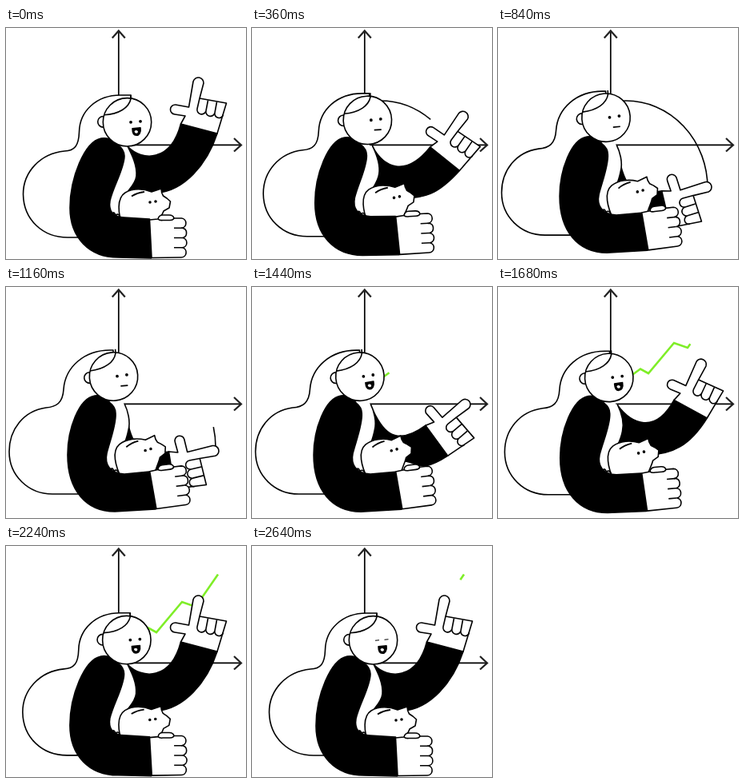
An HTML page that plays this animation: 300 by 289 pixels, repeating every 2680 ms.

```html
<!DOCTYPE html>
<html lang="en">
<head>
<meta charset="utf-8">
<title>Chart gesture</title>
<style>
  html, body { margin: 0; width: 100%; height: 100%; overflow: hidden; background: #fff; }
  svg { display: block; width: 100%; height: 100%; }
  .line { fill: none; }
  .ink { fill: #000; }
</style>
</head>
<body>
<svg viewBox="0 0 300 289" preserveAspectRatio="none" fill="#fff" stroke="#000" stroke-width="1.6" stroke-linejoin="round">
  <g class="line" stroke="#222">
    <path stroke="#000" stroke-width="1.7" d="M140.8 4V88M147 146.4H293"/>
    <path stroke-width="2.2" stroke-linejoin="miter" d="M132.8 12.5L140.8 3.5L148.8 12.5M285 138L294 146.4L285 154.5"/>
  </g>
  <path id="arc" class="line" pathLength="1" d="M140 93Q150 91 160 91A102 109 0 0 1 262 200"/>
  <path id="graph" class="line" pathLength="1" stroke="#7fee28" stroke-width="2.6" stroke-linejoin="miter" d="M158 117L178 102.5L188 108L220 70L237 76L265 35.500"/>
  <path id="hair"/>
  <path id="sleeve" class="ink"/>
  <path id="shirt" stroke="none"/>
  <path id="lapel" class="line"/>
  <g id="pointer">
    <path d="M218.500 120L224 110L211 108A6 6 0 0 1 212 96L228.500 99L234 67A6.600 6.600 0 0 1 247 69L242 88L275.500 94L264 132Z"/>
    <path class="line" d="M242 88L239 101A5.6 5.6 0 0 0 250 103.5L252.5 90.5M250 103.5A5.6 5.6 0 0 0 261 106L263.5 92.5M261 106A5.4 5.4 0 0 0 271.500 108.5"/>
  </g>
  <g id="pig">
    <path d="M146 250C140 232 138 213 149 206C159 200 172 201 182 205Q188 203 194 201Q194 206 196.500 210L201 213L205.500 217L204 225L197 229C195 235 190 241 187 250Z"/>
    <path class="line" stroke-width="1.8" d="M157 210.5Q164 206 173 205"/>
    <g id="pigEyes"><circle cx="180" cy="218" r="1"/><circle cx="187" cy="217" r="1"/></g>
  </g>
  <path id="arm" class="ink"/>
  <path id="tail" class="line" d="M143 237C141 231 136 233 138 236S133 239 134 231C137 230 136 237 141 237"/>
  <g id="fist">
    <path d="M179.500 240L190 239Q191 234 196 234H204Q209 234 210 238H219.500A6.200 6.200 0 0 1 219.500 250.300H220.500A6.200 6.200 0 0 1 220.500 262.500A6.200 6.200 0 0 1 220.500 274.800A6.200 6.200 0 0 1 219 287L182 287.500Z"/>
    <path class="line" d="M190 239Q192 241 196 240.500H205Q209 240.500 210 238M220 250.300H210M220 262.500H210M220 274.800H210"/>
  </g>
  <g id="head">
    <circle cx="-30" cy="-.5" r="6.800"/>
    <circle r="30.200"/>
    <path class="line" d="M4.500 -34V-29C2 -18 -10 -10 -29 -9"/>
    <g id="open" class="ink" stroke="none"><circle cx="4.500" cy="0" r="1.900"/><circle cx="16.500" cy="-1" r="1.900"/></g>
    <path id="shut" class="line" stroke-width="1.100" d="M2.500 .5L7.500 0M14 -.5L19 -1"/>
    <g id="smile">
      <path class="ink" d="M6.500 8L16.500 7C17.500 13.500 14.500 16.500 11.500 16.500C8 16.500 6.500 12.500 6.500 8Z"/>
      <path stroke="none" d="M9 11.500Q11 9 13.500 11.500Q13.500 14 11.500 14Q9.500 14 9 11.500Z"/>
    </g>
    <path id="flat" class="line" d="M8 12.5L17 12.3"/>
  </g>
</svg>
<script>
const LOOP = 2680, STEP = 40;
const el = id => document.getElementById(id);
const set = (id, name, value) => el(id).setAttribute(name, value);
const show = (id, on) => set(id, 'visibility', on ? 'visible' : 'hidden');

// Upright and leaning versions of the soft shapes.
const shapes = {
  hair: [
    'M156 92L156 84L143 84C113 84 92 104 91.5 130C91 147 86 153.5 73 154C43 157 21.5 180 21.5 208C22 240 46 262 77 262L95 262',
    'M134 87L134 79L130 79C98 79 74 100 72 128C71 145 63 150 50 151C22 155 4 178 4 206C4 236 28 259 58 259L95 259'],
  arm: [
    'M140 146C134 139 126 137 119 138C98 142 80 188 80 225C80 262 104 287 140 287L181.5 288L179.5 239L148 237C133 237 128 228 130 216C134 198 148 176 148 160C148 154 145 150 140 146Z',
    'M130 145C126 138 119 135 111 136C91 139 77 178 77 210C77 254 100 281 136 281L187 278L179 231L148 234C130 233 123 222 126 208C130 192 138 172 137 158C137 152 134 148 130 145Z'],
  lapel: [
    'M152 148C158 160 164 172 163 185C162 196 152 203 147 212L143 224',
    'M148 146C152 154 156 168 153 179C151 190 148 196 144 208L140 225']
};

const mix = (a, b, k) => a + (b - a) * k;
function morph([a, b], k) {
  const ends = b.match(/[\d.]+/g);
  let i = 0;
  return a.replace(/[\d.]+/g, n => mix(+n, +ends[i++], k).toFixed(2));
}

// Time, then fingertip x, y and turn in degrees.
const handKeys = [[0, 239.5, 68, 0], [360, 263, 110, 24], [600, 269, 156, 45], [840, 260.5, 198, 62],
  [1160, 259.5, 204, 66], [1440, 266, 146, 39], [1680, 253, 96, 14], [2040, 239.5, 68, 0], [LOOP, 239.5, 68, 0]];
// Time, then how far the body leans.
const leanKeys = [[0, 0], [360, .42], [840, .97], [1000, 1], [1360, 1], [1680, .75], [2000, .19], [2400, 0], [LOOP, 0]];

// Monotone cubic through column c of the keys.
function track(keys, t, c) {
  const rate = i => (keys[i + 1][c] - keys[i][c]) / (keys[i + 1][0] - keys[i][0]);
  const slope = i => {
    if (i === 0 || i === keys.length - 1) return 0;
    const p = rate(i - 1), q = rate(i);
    return p * q <= 0 ? 0 : 2 * p * q / (p + q);
  };
  let i = 0;
  while (i < keys.length - 2 && t >= keys[i + 1][0]) i++;
  const h = keys[i + 1][0] - keys[i][0], s = (t - keys[i][0]) / h, r = 1 - s;
  return keys[i][c] * r * r * (1 + 2 * s) + keys[i + 1][c] * s * s * (3 - 2 * s)
    + h * s * r * (slope(i) * r - slope(i + 1) * s);
}

const ease = (t, from, to) => {
  const k = Math.min(1, Math.max(0, (t - from) / (to - from)));
  return (1 - Math.cos(k * Math.PI)) / 2;
};

function trace(id, from, to) {
  show(id, to - from > .002);
  set(id, 'stroke-dasharray', `0 ${from} ${Math.max(0, to - from)} 2`);
}

function drawSleeve(x, y, turn, lean) {
  const a = turn * Math.PI / 180, cos = Math.cos(a), sin = Math.sin(a), k = turn / 66;
  const at = (px, py) => {
    const dx = px - 239.5, dy = py - 68;
    return `${x + dx * cos - dy * sin} ${y + dx * sin + dy * cos}`;
  };
  const bendX = mix(170, 155, k), bendY = 167 + 14 * Math.sin(k * Math.PI / 2);
  set('sleeve', 'd', `M${mix(152, 148, lean)} ${mix(148, 147, lean)}`
    + `C${bendX} ${bendY} ${at(206, 168)} ${at(218.5, 120)}L${at(264, 132)}`
    + `C${at(251, 172)} ${mix(222, 200, k)} ${mix(203, 230, k)} ${mix(190, 185, k)} ${mix(206, 225, k)}`
    + `L150 222L${mix(145, 142, lean)} 195Z`);
}

function draw(t) {
  const lean = track(leanKeys, t, 1);
  const [x, y, turn] = [1, 2, 3].map(c => track(handKeys, t, c));

  for (const id in shapes) set(id, 'd', morph(shapes[id], lean));
  set('shirt', 'd', morph(shapes.lapel, lean) + 'L126 228L126 147Z');
  drawSleeve(x, y, turn, lean);
  set('pointer', 'transform', `translate(${x} ${y}) rotate(${turn}) translate(-239.5 -68)`);
  set('fist', 'transform', `translate(0 ${-2 * lean}) rotate(${-7 * lean} 120 235)`);
  set('pig', 'transform', `translate(${-6 * lean} ${-13.5 * lean}) rotate(${-8 * lean} 180 217)`);
  set('pigEyes', 'fill', lean > .6 ? '#fff' : '#000');
  set('tail', 'transform', `translate(${-2 * lean} ${-4 * lean})`);
  set('head', 'transform', `translate(${mix(151.5, 134.5, lean)} ${mix(117.8, 112, lean)}) rotate(${-4 * lean})`);

  const blink = t >= 2560, happy = t < 200 || t >= 1400;
  show('open', !blink);
  show('shut', blink);
  show('smile', happy);
  show('flat', !happy);

  trace('arc', ease(t, 780, 1280), ease(t, 0, 740));
  trace('graph', ease(t, 2180, 2720), ease(t, 1320, 1880));
}

const start = performance.now();
function tick() {
  const t = (performance.now() - start) % LOOP;
  draw(Math.floor(t / STEP) * STEP);
  requestAnimationFrame(tick);
}
draw(0);
requestAnimationFrame(tick);
</script>
</body>
</html>
```
